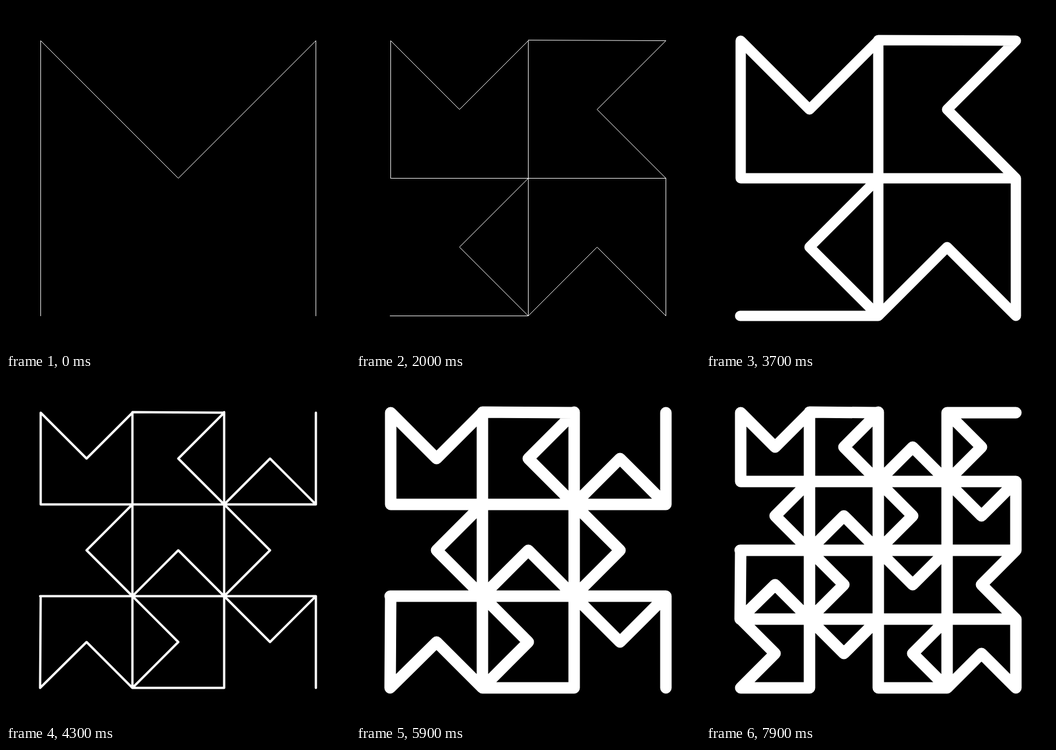
An HTML page for the animation above (8 s loop, 600 by 600 pixels).

```html
<!DOCTYPE html>
<html lang="en">
<head>
<meta charset="utf-8">
<title>Turning M grid</title>
<style>
  html, body { margin: 0; width: 100%; height: 100%; overflow: hidden; background: #000; }
  svg { display: block; width: 100%; height: 100%; }
</style>
</head>
<body>
<svg viewBox="0 0 600 600">
  <path id="grid" fill="none" stroke="#fff" stroke-linecap="round" stroke-linejoin="round"/>
</svg>
<script>
const STEP = 100, STEPS_PER_GRID = 20, GRIDS = 4;
const MARGIN = 60, SPAN = 480;
const M_SHAPE = [[-1, 1], [-1, -1], [0, 0], [1, -1], [1, 1]];
const grid = document.getElementById('grid');

// Snap to pixel centres; single precision keeps the slight slant of turned edges.
const snap = v => Math.floor(Math.fround(v)) + 0.5;

function letter(cx, cy, half, quarterTurns) {
  const angle = Math.fround(quarterTurns * Math.PI / 2);
  const cos = Math.cos(angle), sin = Math.sin(angle);
  return 'M' + M_SHAPE.map(([x, y]) =>
    snap(cx + half * (x * cos - y * sin)) + ' ' +
    snap(cy + half * (x * sin + y * cos))).join('L');
}

function gridPath(n) {
  const size = SPAN / n;
  const centre = i => MARGIN + size * (i + 0.5);
  let d = '';
  for (let row = 0; row < n; row++)
    for (let col = 0; col < n; col++)
      d += letter(centre(col), centre(row), size / 2, (row + col) % 4);
  return d;
}

const paths = Array.from({ length: GRIDS }, (_, i) => gridPath(i + 1));

function render(ms) {
  const step = Math.floor(ms / STEP) % (STEPS_PER_GRID * GRIDS);
  grid.setAttribute('d', paths[Math.floor(step / STEPS_PER_GRID)]);
  grid.setAttribute('stroke-width', step % STEPS_PER_GRID + 1);
}

const start = performance.now();
function tick() {
  render(performance.now() - start);
  requestAnimationFrame(tick);
}
tick();
</script>
</body>
</html>
```
